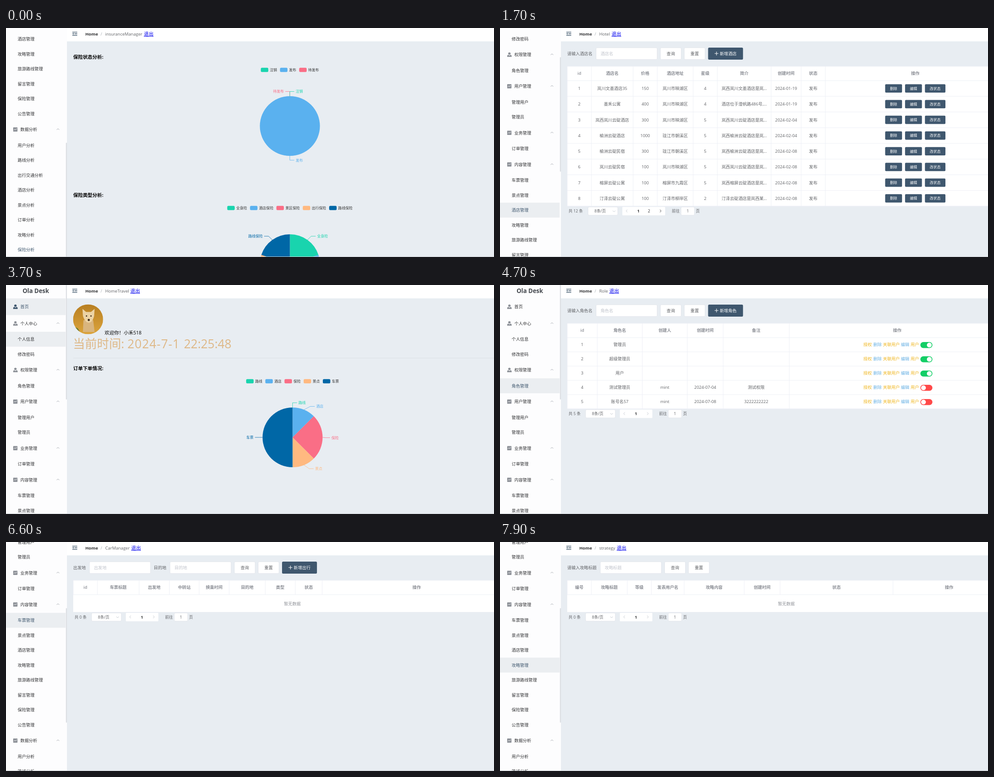
An HTML page for the animation above (8 s loop, 1089 by 514 pixels).

```html
<!DOCTYPE html>
<html lang="zh-CN">
<head>
<meta charset="utf-8">
<style>
html, body { margin: 0; width: 100%; height: 100%; overflow: hidden; background: #e8edf2; }
svg { display: block; }
text { font-family: "Open Sans", "Noto Sans CJK SC", "Noto Sans CJK", sans-serif; white-space: pre; }
</style>
</head>
<body>
<svg id="stage" width="1089" height="514" viewBox="0 0 1089 514"></svg>
<script>
const stage = document.getElementById('stage');
const DARK = '#3f576e', GREY = '#606266', PALE = '#c0c4cc', LINE = '#ebeef5';
const HUES = ['#19d4ae', '#5ab1ef', '#fa6e86', '#ffb980', '#0067a6'];

// ---- drawing helpers (y of text is its visual centre) ----
const text = (x, y, s, size = 9.4, fill = GREY, anchor = 'start', weight = 400, extra = '') =>
  `<text x="${x}" y="${y + size * .37}" font-size="${size}" fill="${fill}" text-anchor="${anchor}" font-weight="${weight}" ${extra}>${s}</text>`;
const mid = (x, y, s, size, fill, weight) => text(x, y, s, size, fill, 'middle', weight);
const rect = (x, y, w, h, fill, r = 0, stroke = 'none') =>
  `<rect x="${x}" y="${y}" width="${w}" height="${h}" rx="${r}" fill="${fill}" stroke="${stroke}" stroke-width=".7"/>`;
const path = (d, stroke, w = 1, fill = 'none') =>
  `<path d="${d}" stroke="${stroke}" stroke-width="${w}" fill="${fill}"/>`;
const shape = (d, fill) => path(d, 'none', 0, fill);
const dot = (x, y, r, fill) => `<circle cx="${x}" cy="${y}" r="${r}" fill="${fill}"/>`;
const chevron = (x, y, dx, dy, color = '#a2a6ad') => // tip points towards (dx, dy)
  path(`M${x - dx - 3 * dy} ${y - dy - 3 * dx}L${x + dx * 1.5} ${y + dy * 1.5}L${x - dx + 3 * dy} ${y - dy + 3 * dx}`, color, .9);

// ---- side menu ----
const menu = [
  ['首页'], ['个人中心', '个人信息', '修改密码'], ['权限管理', '角色管理'],
  ['用户管理', '管理用户', '管理员'], ['业务管理', '订单管理'],
  ['内容管理', ...['车票', '景点', '酒店', '攻略', '旅游路线', '留言', '保险', '公告'].map(s => s + '管理')],
  ['数据分析', ...['用户', '路线', '出行交通', '酒店', '景点', '订单', '攻略', '保险'].map(s => s + '分析')]
];

function menuIcon(y, person, color) {
  if (person) return dot(21, y - 2.4, 2.7, color) +
    shape(`M16 ${y + 5}v-1.5q0-3 3-3l2 1.8l2-1.8q3 0 3 3v1.5z`, color);
  return rect(16, y - 4.7, 9.6, 9.4, color, 1) +
    path(`M17.5 ${y + 1.5}l2.3-2.3l1.8 1.6l2.8-3`, '#fff', 1);
}

function sidebar(scroll, lit, active) {
  let out = rect(0, 0, 136, 514, '#fdfdfe') + mid(66.5, 13 - scroll, 'Ola Desk', 13.4, '#45494f', 700);
  let y = 30 - scroll;
  menu.forEach((group, g) => group.forEach((name, i) => {
    const h = i ? 33.5 : 37.5, c = y + h / 2;
    if (lit.includes(name)) out += rect(0, y, 133, h, '#ebeef1');
    if (!i) {
      out += menuIcon(c, g < 3, name == active ? DARK : '#8d9198');
      if (g) out += chevron(116, c - .3, 0, -1);
    }
    out += text(i ? 26 : 32, c, name, 9.4, name == active ? DARK : '#303133');
    y += h;
  }));
  return out + rect(133.7, scroll / 2, 2.3, 257, '#dcdfe3', 1);
}

// ---- page parts ----
const header = (route, exitX) =>
  rect(136, 0, 953, 30, '#fff') +
  path('M148 9.3h11M152.5 13h6.5M148 16.7h11', '#304a60', 1.3) + shape('M148 13l3-2v4z', '#304a60') +
  text(177, 13, 'Home', 9.6, '#303133', 'start', 700) + text(211, 13, '/', 9.6, '#a8adb5') +
  text(221.5, 13, route, 9.5) + text(exitX, 13.3, '退出', 10.7, '#00e', 'start', 400, 'text-decoration="underline"');

const field = (x, y, w, h) => rect(x, y, w, h, '#fff', 2.5, '#dcdfe6');

// inputs: [label, placeholder] pairs
function search(inputs, add) {
  let x = 150, out = '';
  for (const [label, hint] of inputs) {
    out += text(x, 57.5, label);
    x += label.length * 9.4 + 8;
    out += field(x, 44.3, 136.3, 26.4) + text(x + 10, 57.5, hint, 9.4, PALE);
    x += 143.6;
  }
  for (const s of ['查询', '重置']) {
    out += field(x, 44.3, 46.4, 26.4) + mid(x + 23.2, 57.5, s);
    x += 53.2;
  }
  if (add) out += rect(x, 44, add.length * 9.4 + 40.3, 27, DARK, 2.5) +
    path(`M${x + 14.5} 57.3h8.5m-4.25-4.25v8.5`, '#fff', 1.1) + text(x + 26, 57.5, add, 9.4, '#fff', 'start', 500);
  return out;
}

function buttons(c, y, names) {
  const width = s => s.length * 8.04 + 21.6;
  let x = c - (names.reduce((sum, s) => sum + width(s), 0) + 6.7 * (names.length - 1)) / 2;
  return names.map(s => {
    const w = width(s), out = rect(x, y - 9.4, w, 18.8, DARK, 2) + mid(x + w / 2, y, s, 8.04, '#fff', 500);
    x += w + 6.7;
    return out;
  }).join('');
}

function pager(total, bottom) {
  const y = bottom + 11, many = total > 8, s = many ? 196.5 : 191, p = s + 76.5, w = many ? 95.5 : 72.5, j = p + w + 15;
  return text(153, y, `共 ${total} 条`, 8.7) + field(s, y - 9.2, 66.3, 18.4) +
    mid(s + 27, y, '8条/页', 8.7) + chevron(s + 58, y, 0, 1, PALE) +
    rect(p, y - 9.4, w, 18.8, '#fff', 1.5) + chevron(p + 10, y - .3, -1, 0, PALE) +
    mid(p + 35.7, y, '1', 9, '#303133', 700) + (many ? mid(p + 59.5, y, '2', 8.7, '#303133') : '') +
    chevron(p + w - 10.5, y - .3, 1, 0, many ? '#303133' : PALE) +
    text(j, y, '前往', 8.7) + field(j + 20.5, y - 9.2, 30, 18.4) + mid(j + 35.5, y, '1', 8.7) + text(j + 53.5, y, '页', 8.7);
}

// cells are strings, or functions (centre x, centre y) => markup
function table(edges, heads, rows, h, total = rows.length) {
  edges = [...edges, 1127.5];
  const bottom = rows.length ? 118 + rows.length * h : 157.5;
  const centre = i => (edges[i] + edges[i + 1]) / 2;
  let out = rect(150, 86, 980, bottom - 86, '#fff'), grid = `M150 86H1089M150 118.2H1089M150 ${bottom}H1089`;
  heads.forEach((s, i) => out += mid(centre(i), 101.5, s, 9.4, '#8b8e95', 600));
  rows.forEach((row, r) => {
    const y = 118 + (r + .5) * h;
    grid += `M150 ${y + h / 2}H1089`;
    row.forEach((cell, i) => out += typeof cell == 'function' ? cell(centre(i), y) : mid(centre(i), y, cell));
  });
  if (!rows.length) out += mid(639, 138.3, '暂无数据', 9.4, '#909399');
  for (const x of edges) grid += `M${x} 86V${rows.length ? bottom : 118}`;
  return out + path(grid, LINE, .9) + pager(total, bottom);
}

// ---- charts ----
function legend(cx, y, names) {
  const width = s => 20 + s.length * 8.04;
  let x = cx - (names.reduce((sum, s) => sum + width(s), 0) + 6.7 * (names.length - 1)) / 2;
  return names.map((s, i) => {
    const out = rect(x, y - 4.4, 16.7, 9.4, HUES[i], 2.5) + text(x + 20, y, s, 8.04, '#333');
    x += width(s) + 6.7;
    return out;
  }).join('');
}

function pie(cx, cy, parts, shown = 1) {
  const R = 67, at = f => `${cx + R * Math.sin(f * 2 * Math.PI)} ${cy - R * Math.cos(f * 2 * Math.PI)}`;
  let from = 0, out = '';
  parts.forEach((p, i) => {
    const to = Math.min(from + p, shown);
    if (to - from > .999) out += dot(cx, cy, R, HUES[i]);
    else if (to > from) out += shape(`M${cx} ${cy}L${at(from)}A${R} ${R} 0 ${to - from > .5 ? 1 : 0} 1 ${at(to)}z`, HUES[i]);
    from += p;
  });
  return out;
}

// leader from (x, y) to an elbow, then sideways to the name
const label = (name, hue, x, y, ex, ey, side = 1) =>
  path(`M${x} ${y}L${ex} ${ey}h${10 * side}`, HUES[hue], .8) +
  text(ex + 13.2 * side, ey, name, 8.04, HUES[hue], side > 0 ? 'start' : 'end');

const title = (y, s) => text(150, y, s + ':', 10.7, '#000', 'start', 700);

// ---- pictures, 67 by 67 ----
const photos = {
  dog: rect(0, 0, 67, 67, 'url(#wood)') + shape('M0 54q10-6 14 6v7H0z', '#6c7d2a') +
    shape('M23 36q12-6 22 0l3 26H22z', '#d9b57e') +
    shape('M21 10l8 7h11l8-7l-1 16q-4 15-12 15t-13-15z', '#ecd3a4') +
    dot(30, 26, 1.5, '#3a2a1c') + dot(40, 26, 1.5, '#3a2a1c') + dot(35, 35, 2.4, '#3a2a1c'),
  room: rect(0, 0, 67, 67, '#b7aa98') + shape('M0 0h67v19L35 7L0 22z', '#67513c') +
    shape('M0 22l16-6v35H0z', '#6c7567') + rect(18, 19, 14, 25, '#e4ece6') + rect(41, 19, 14, 11, '#d8c3a4') +
    shape('M27 9h12l3 9H24z', '#f4e6c4') + shape('M0 50h67v17H0z', '#77583e') +
    shape('M16 45l25-9l25 6v16l-31 7z', '#e2d6c4') + shape('M16 45l19 7v13l-19-7z', '#c4b39d'),
  falls: rect(0, 0, 67, 67, '#3f7a35') + shape('M0 0h67v8L45 3L30 13L15 9L0 19z', '#a5d2ee') +
    shape('M0 22q20-16 38-5t29-4v16H0z', '#57963f') +
    [5, 14, 25, 35, 46, 57].map((x, i) => shape(`M${x} ${36 - i % 3 * 4}h5l3 23h-9z`, '#dfebe8')).join('') +
    shape('M0 56q30-7 67 0v11H0z', '#57a58a')
};
const photo = (kind, x, y, extra = '') => `<g transform="translate(${x} ${y})" ${extra}>${photos[kind]}</g>`;
const defs = `<defs><linearGradient id="wood" x2="0" y2="1"><stop stop-color="#b87f22"/><stop offset="1" stop-color="#dba43c"/></linearGradient>
<clipPath id="disc"><circle cx="33.5" cy="33.5" r="33.5"/></clipPath></defs>`;

// ---- data ----
const edit = names => (x, y) => buttons(x, y, names);
const three = edit(['删除', '编辑', '改状态']), two = edit(['编辑', '改状态']);
const hotelEdges = [150, 204, 297, 351, 431, 485, 605, 672, 726];
const hotelHeads = (name, place) => ['id', name, '价格', place, '星级', '简介', '创建时间', '状态', '操作'];
const LAN = '岚川市映湖区', LONG = '珑江市朝溪区', inn = s => `岚西${s}酒店是岚...`;
const hotels = [
  ['岚川文墨酒店35', 150, LAN, 4, inn('岚川文墨'), '01-19'],
  ['墨禾公寓', 400, LAN, 4, '酒店位于澄帆路486号,...', '01-19'],
  ['岚西岚川云碇酒店', 300, LAN, 5, inn('岚川云碇'), '02-04'],
  ['榆洲云碇酒店', 1000, LONG, 5, inn('榆洲云碇'), '02-04'],
  ['榆洲云碇民宿', 300, LONG, 5, inn('榆洲云碇'), '02-08'],
  ['岚川云碇民宿', 100, LAN, 5, inn('岚川云碇'), '02-08'],
  ['榕屏云碇公寓', 100, '榕屏市九霞区', 5, inn('榕屏云碇'), '02-08'],
  ['汀泽云碇公寓', 100, '汀泽市柳岸区', 2, '汀泽云碇酒店是岚西某...', '02-08']
].map((r, i) => [i + 1, ...r.slice(0, 5), '2024-' + r[5], '发布', three]);
const spots = ['岚川映月湖', '榆洲古渡口', '榕屏观云台'].map((s, i) =>
  [i + 1, s, 60 + i * 20, i == 1 ? LONG : LAN, 5, `${s}风景区位于...`, '2024-02-08', '发布', three]);
const users = Array.from({ length: 8 }, (_, i) =>
  [i + 1, 'pine' + (31 + i * 7), '游客' + (314 + i * 9), '100000004' + (52 + i * 3), '2024-02-' + (21 + i), '发布', three]);
const admins = [
  ['mint', '小禾518', 'dog', '10000000451', '01-28'],
  ['mint35', '530948', 'room', '10000000827', '02-21'],
  ['mint408', '呼噜噜', 'falls', '10000000936', '02-23']
].map(([user, nick, pic, phone, day], i) =>
  [i + 1, user, nick, (x, y) => photo(pic, x - 33.7, y - 36), phone, '2024-' + day, '发布', two]);

const roleTools = on => (x, y) =>
  [['授权', 811], ['删除', 833], ['关联用户', 854.5], ['编辑', 894.7], ['用户', 916.3]]
    .map(([s, left], i) => text(left, y, s, 9.4, i % 2 ? '#69b1e4' : '#efb51d')).join('') +
  rect(938, y - 6, 27, 13.4, on ? '#13ce66' : '#ff4949', 6.7) + dot(on ? 958 : 945, y + .7, 5.4, '#fff');
const roles = [
  ['管理员', '', '', ''], ['超级管理员', '', '', ''], ['用户', '', '', ''],
  ['测试管理员', 'mint', '2024-07-04', '测试权限'], ['账号名57', 'mint', '2024-07-08', '3222222222']
].map((r, i) => [i + 1, ...r, roleTools(i < 3)]);

// ---- pages: active menu item and contents ----
const pages = {
  insurance: ['保险分析', () => header('insuranceManager', 307.7) +
    title(65.5, '保险状态分析') + legend(633.5, 93.7, ['注销', '发布', '待发布']) + pie(633.5, 220, [0, 1, 0]) +
    label('待发布', 2, 633.3, 153, 633.3, 142.5, -1) + label('注销', 0, 633.3, 153, 633.3, 142.5) +
    label('发布', 1, 633.3, 287, 633.3, 296.7) +
    title(375.5, '保险类型分析') + legend(633.5, 403.7, ['全身险', '酒店保险', '景区保险', '出行保险', '路线保险']) +
    pie(633.5, 530, [.2, .2, .2, .2, .2]) +
    label('全身险', 0, 672.5, 476, 681, 467.3) + label('路线保险', 4, 594.5, 476, 586, 467.3, -1)],
  hotel: ['酒店管理', () => header('Hotel', 249) + search([['请输入酒店名', '酒店名']], '新增酒店') +
    table(hotelEdges, hotelHeads('酒店名', '酒店地址'), hotels, 35.25, 12)],
  home: ['首页', t => {
    const k = Math.min(1, (t - 2800) / 500), c = 639.5;
    return header('HomeTravel', 277.5) + photo('dog', 149.7, 43.5, 'clip-path="url(#disc)"') +
      text(220, 107.3, '欢迎你！小禾518', 10.7, '#000') +
      text(149.5, 132, '当前时间:', 26.8, '#deb887') +
      text(271, 132, '2024-7-1', 26.8, '#deb887', 'start', 400, 'letter-spacing="1"') +
      text(397, 132, '22:25:' + (t < 3600 ? 47 : 48), 26.8, '#deb887') +
      path('M150 164H1089', '#d8dde2', .9) + title(187.5, '订单下单情况') +
      legend(c, 215.7, ['路线', '酒店', '保险', '景点', '车票']) +
      pie(c, 342, [0, .125, .25, .125, .5], 1 - (1 - k) ** 3) +
      label('路线', 0, c, 275, c, 264.3) + label('酒店', 1, 665, 280, 679, 272.5) +
      label('保险', 2, 706.5, 342, 713, 342.7) + label('景点', 3, 665, 404, 676.5, 412.3) +
      label('车票', 4, 572.5, 342, 565.5, 342, -1);
  }],
  info: ['个人信息', () => header('UserInfo', 264)],
  password: ['修改密码', () => header('Password', 268)],
  role: ['角色管理', () => header('Role', 244) + search([['请输入角色名', '角色名']], '新增角色') +
    table([150, 217, 317.5, 418, 498, 645.5], ['id', '角色名', '创建人', '创建时间', '备注', '操作'], roles, 32)],
  users: ['管理用户', () => header('User', 245) + search([['用户名', '请输入用户名']]) +
    table([150, 204, 277, 351, 428, 498, 560], ['id', '用户名', '昵称', '联系电话', '创建时间', '状态', '操作'], users, 35.25)],
  admins: ['管理员', () => header('User', 245) + search([['管理名', '请输入管理名']], '新增管理员') +
    table([150, 196.5, 277, 351, 767, 847, 920.5, 974],
      ['编号', '用户名', '管理名', '图片', '联系电话', '创建时间', '状态', '操作'], admins, 88.2)],
  cars: ['车票管理', () => header('CarManager', 279.5) + search([['出发地', '出发地'], ['目的地', '目的地']], '新增出行') +
    table([150, 204, 297, 364.5, 431, 498, 578.5, 645.5, 705.5],
      ['id', '车票标题', '出发地', '中转站', '换乘时间', '目的地', '类型', '状态', '操作'], [])],
  spots: ['景点管理', () => header('Scenic', 253) + search([['请输入景点名', '景点名']], '新增景点') +
    table(hotelEdges, hotelHeads('景点名', '景点地址'), spots, 35.25)],
  strategy: ['攻略管理', () => header('strategy', 260.5) + search([['请输入攻略标题', '攻略标题']]) +
    table([150, 204, 284, 338, 411, 545, 625, 877],
      ['编号', '攻略标题', '等级', '发表用户名', '攻略内容', '创建时间', '状态', '操作'], [])]
};

// time, page, highlighted menu items
const script = [
  [0, 'insurance'], [1500, 'insurance', '酒店管理'], [1600, 'hotel', '酒店管理'], [1800, 'hotel'],
  [2000, 'hotel', '权限管理'], [2700, 'hotel', '首页'], [2900, 'home', '首页'], [3600, 'home', '首页', '个人信息'],
  [3800, 'info', '个人信息'], [4100, 'info', '修改密码'], [4200, 'password', '修改密码'],
  [4700, 'role', '角色管理'], [5000, 'role', '管理用户'], [5100, 'users', '管理用户'],
  [5400, 'admins', '管理员'], [5700, 'admins'], [6500, 'cars', '车票管理'], [7000, 'spots', '景点管理'],
  [7300, 'spots', '酒店管理'], [7400, 'hotel', '酒店管理'], [7700, 'hotel', '攻略管理'], [7900, 'strategy', '攻略管理']
];

const ramp = (t, a, b) => Math.max(0, Math.min(1, (t - a) / (b - a)));
const scrollAt = t => 515 - 384 * ramp(t, 1000, 1400) - 131 * ramp(t, 1700, 1900) + 297 * ramp(t, 5500, 6000);

let last = -1;
function draw() {
  const t = Math.floor(performance.now() % 8000 / 100) * 100;
  if (t != last) {
    last = t;
    const [, name, ...lit] = script.findLast(step => step[0] <= t);
    const [active, body] = pages[name];
    stage.innerHTML = defs + rect(0, 0, 1089, 514, '#e8edf2') + body(t) +
      sidebar(scrollAt(t), lit, active) + path('M0 513.5H1089', '#c3c7cb');
  }
  requestAnimationFrame(draw);
}
draw();
</script>
</body>
</html>
```
